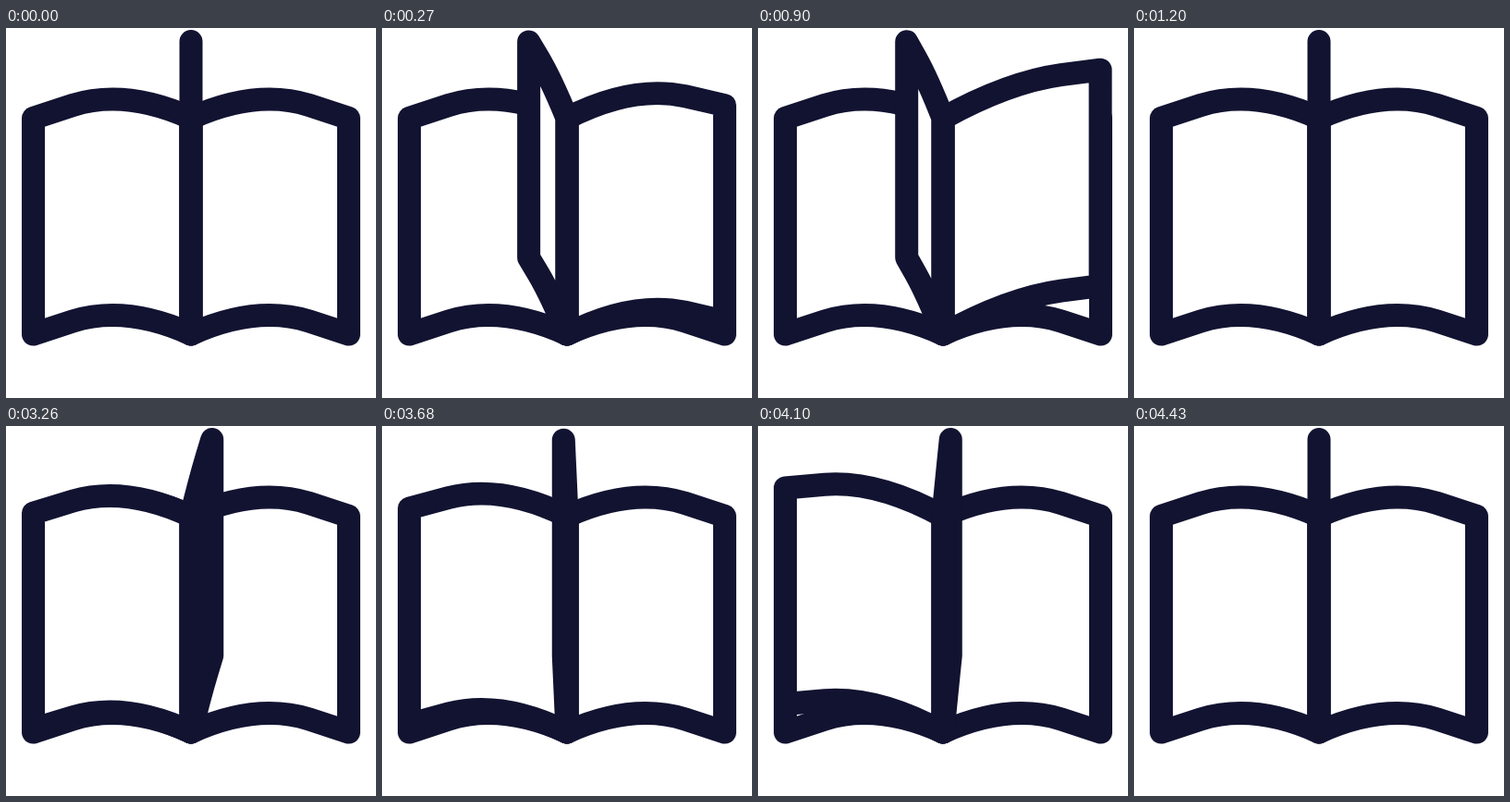
These frames come from a looping animation (400 by 400 pixels, 5460 ms). An HTML page with a canvas:

```html
<!DOCTYPE html>
<html lang="en">
<head>
<meta charset="utf-8">
<title>Book</title>
<style>
  html, body { margin: 0; width: 100%; height: 100%; overflow: hidden; background: #fff; }
  canvas { display: block; width: 400px; height: 400px; }
</style>
</head>
<body>
<canvas id="stage" width="400" height="400"></canvas>
<script>
const ctx = document.getElementById('stage').getContext('2d');
const LOOP = 5460, BACK = 3230, FLIP = 1200;
const SPINE = 200, TOP = 97.5, HEIGHT = 233.5, WIDTH = 170.5, LIFT = 83;
const RISE = 210, FALL = 165;
// moments at which successive pages stand upright
const crossings = [8, 230, 451.5, 640, 862, 1030, FLIP];

// reach: signed distance from the spine, -1 to 1; lift: 0 flat, 1 upright
function drawPage({ reach, lift, bulge }) {
  // f: 0 at the outer edge, 1 at the spine; bend: height above the chord
  const point = (f, bend) => [
    SPINE + reach * WIDTH * (1 - f),
    TOP - lift * LIFT * (1 - f) - bulge * bend
  ];
  const lower = ([x, y]) => [x, y + HEIGHT];
  const edge = point(0, 0), joint = point(0.25, 0.7);
  const c1 = point(0.5, 1.36), c2 = point(0.76, 0.925), hinge = point(1, 0);
  ctx.beginPath();
  ctx.moveTo(...edge);
  ctx.lineTo(...joint);
  ctx.bezierCurveTo(...c1, ...c2, ...hinge);
  ctx.lineTo(...lower(hinge));
  ctx.bezierCurveTo(...lower(c2), ...lower(c1), ...lower(joint));
  ctx.lineTo(...lower(edge));
  ctx.closePath();
  ctx.fill();
  ctx.stroke();
}

// s: time since the page stood upright; dir: side it is turning towards
function turningPage(s, dir) {
  if (s < 0) {
    const u = 1 + s / RISE, lifted = 0.35;
    const swing = Math.max(0, (u - lifted) / (1 - lifted)) ** 2;
    const lift = u < lifted ? 0.63 * (u / lifted) ** 1.4 : 0.63 + 0.37 * swing;
    return { reach: -dir * (1 - swing), lift, bulge: 20 * (1 - lift ** 1.7) };
  }
  const reach = s / FALL;
  return { reach: dir * reach, lift: Math.cbrt(1 - reach ** 3), bulge: 20 * reach };
}

function pagesAt(t) {
  const dir = t < BACK ? -1 : 1;
  const time = t < BACK ? t : t - BACK;
  if (time >= FLIP) return [turningPage(0, dir)];
  return crossings
    .map((c, i) => i ? time - c : Math.max(0, time - c))
    .filter(s => s > -RISE && s < FALL)
    .map(s => turningPage(s, dir))
    .sort((a, b) => Math.abs(b.reach) - Math.abs(a.reach));
}

function render(now) {
  ctx.fillStyle = '#fff';
  ctx.fillRect(0, 0, 400, 400);
  ctx.strokeStyle = '#121331';
  ctx.lineWidth = 25;
  ctx.lineJoin = 'round';
  for (const reach of [-1, 1]) drawPage({ reach, lift: 0, bulge: 20 });
  pagesAt(now % LOOP).forEach(drawPage);
  // keep the spine above the white page fills
  ctx.beginPath();
  ctx.moveTo(SPINE, TOP);
  ctx.lineTo(SPINE, TOP + HEIGHT);
  ctx.stroke();
}

let start;
function tick(now) {
  start ??= now;
  render(now - start);
  requestAnimationFrame(tick);
}
render(0);
requestAnimationFrame(tick);
</script>
</body>
</html>
```
